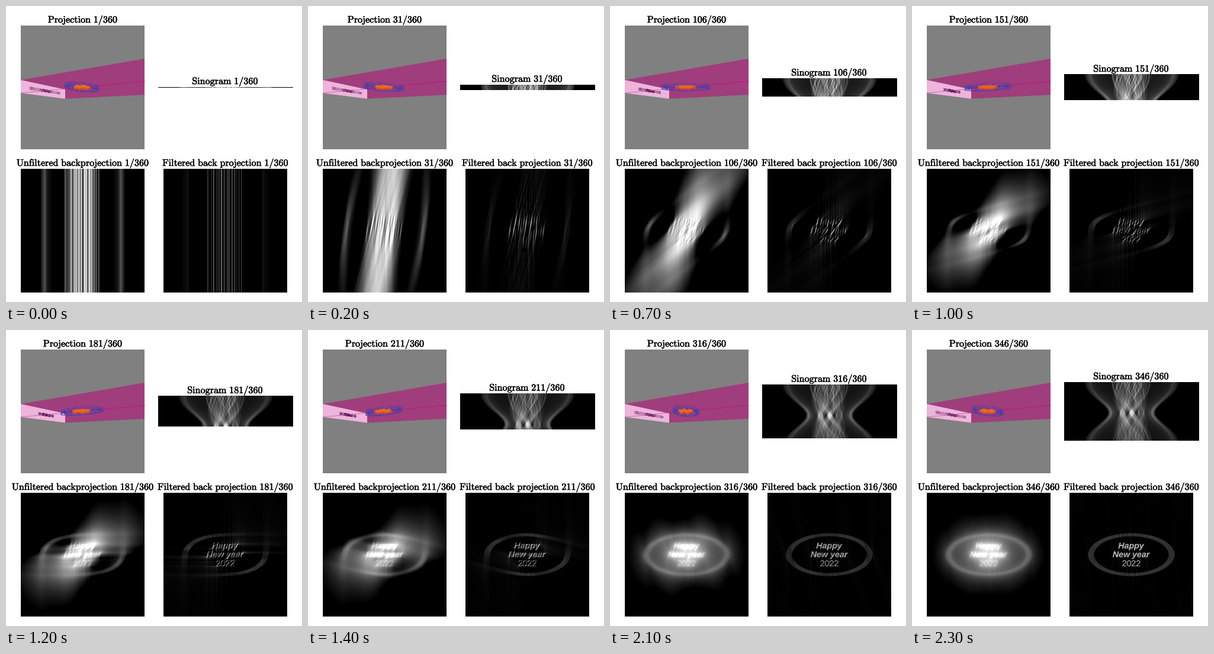
Animation of 500 by 500 pixels, one loop 2.4 s. Source, as a matplotlib script:

```python
import numpy as np
import matplotlib.pyplot as plt
from matplotlib.animation import FuncAnimation
from matplotlib.colors import LinearSegmentedColormap
from matplotlib.patches import PathPatch, Polygon, Rectangle
from matplotlib.path import Path
from matplotlib.patheffects import withStroke
from matplotlib.textpath import TextPath
from matplotlib.transforms import Affine2D

plt.rcParams["mathtext.fontset"] = "cm"

FRAMES, STEP, TOTAL = 24, 15, 360
HALF = 104.5                 # half the side of a panel, in pixels
BIN = 0.5                    # detector bin width
N = int(2 * HALF / BIN)
RING_OUT, RING_IN = (73, 36.3), (63, 31)
RING_VALUE = 0.25


def line_path(s, baseline, **font):
    """One centred line of text, y pointing down."""
    p = TextPath((0, 0), s, size=14.2, prop=dict(family="Liberation Sans", **font))
    box = p.get_extents()
    return Path((p.vertices - [(box.x0 + box.x1) / 2, 0]) * [1, -1] + [0, baseline],
                p.codes)


BOLD = dict(weight="bold", style="italic")
words = Path.make_compound_path(line_path("Happy", -10.5, **BOLD),
                                line_path("New year", 4.3, **BOLD),
                                line_path("2022", 19.5))


def cloud(w, h):
    x, y = np.meshgrid(np.arange(-w + 0.125, w, 0.25), np.arange(-h + 0.125, h, 0.25))
    return np.column_stack([x.ravel(), y.ravel()])


def in_ellipse(p, axes):
    return ((p / axes) ** 2).sum(axis=1) < 1


def make_phantom():
    """Points and weights of the ring and the lettering."""
    ring = cloud(74, 38)
    ring = ring[in_ellipse(ring, RING_OUT) & ~in_ellipse(ring, RING_IN)]
    text = cloud(36, 26)
    mask = np.zeros(len(text), bool)
    for poly in words.to_polygons(Affine2D().scale(20)):
        mask ^= Path(poly / 20).contains_points(text)
    text = text[mask]
    weights = np.r_[np.full(len(ring), RING_VALUE), np.ones(len(text))]
    return np.vstack([ring, text]), weights * 0.25 ** 2 / BIN


def project(points, weights, a):
    u = (points @ [np.cos(a), np.sin(a)] + HALF) / BIN - 0.5
    i = np.floor(u).astype(int)
    f = u - i
    return (np.bincount(i, weights * (1 - f), N)
            + np.bincount(i + 1, weights * f, N))


def ramp(row):
    size = 1024
    return np.fft.irfft(np.fft.rfft(row, size) * np.fft.rfftfreq(size))[:N]


def to_gray(img, low, high):
    """Scale to 0..1 and halve the resolution."""
    img = np.clip((img - low) / (high - low), 0, 1)
    return img.reshape(N // 2, 2, N // 2, 2).mean(axis=(1, 3))


def scan():
    """Sinogram rows, and both reconstructions at every shown step."""
    points, weights = make_phantom()
    det = (np.arange(N) + 0.5) * BIN - HALF
    total = np.zeros((N, N), complex)
    rows, plain, sharp = [], [], []
    for k in range((FRAMES - 1) * STEP + 1):
        a = np.pi * k / TOTAL
        row = project(points, weights, a)
        rows.append(row)
        t = det[None, :] * np.cos(a) + det[:, None] * np.sin(a)
        total += np.interp(t, det, row + 1j * ramp(row), left=0, right=0)
        if k % STEP == 0:
            raw, fil = total.real, total.imag
            plain.append(to_gray(raw, *np.percentile(raw, [50, 99.3])))
            sharp.append(to_gray(fil, 0, 1.15 * fil.max()))
    return np.array(rows), plain, sharp


sino, plain, sharp = scan()

fig = plt.figure(figsize=(5, 5), dpi=100, facecolor="white")
ax = fig.add_axes([0, 0, 1, 1])
ax.set(xlim=(0, 500), ylim=(500, 0))
ax.axis("off")


def panel(data, extent):
    return ax.imshow(data, cmap="gray", vmin=0, vmax=1, aspect="auto", extent=extent)


def title(x, y):
    return ax.text(x, y, "", size=11.6, ha="center", va="baseline",
                   path_effects=[withStroke(linewidth=0.4, foreground="black")])


plain_im = panel(plain[0], (25, 234, 484, 275))
sharp_im = panel(sharp[0], (266, 475, 484, 275))
sino_im = panel(sino[:1], (257, 485, 138, 137))
titles = {"Projection": title(130, 28), "Sinogram": title(370.5, 132),
          "Unfiltered backprojection": title(130, 270),
          "Filtered back projection": title(371, 270)}

# scanner view: background, beam, detector
PINK = "#eeb4dc"
ax.add_patch(Rectangle((25, 33), 209, 209, fc="#808080", lw=0))
ax.add_patch(Polygon([(25, 125), (234, 89), (234, 150), (100, 156.7), (100, 141)],
                     fc="#a03d7d", lw=0))
ax.add_patch(Polygon([(25, 125), (100, 141), (100, 156.7), (25, 147)], fc=PINK, lw=0))

s = np.linspace(0, 1, N // 2 + 1)
f = 1.375 * s / (1 - s + 1.375 * s)      # perspective along the detector
top, bottom = 125 + 16 * f, 147 + 9.7 * f
v = np.array([[0.38], [0.64]])
shadow = ax.pcolormesh(np.vstack([25 + 75 * f] * 2), top + v * (bottom - top),
                       np.zeros((1, N // 2)), vmin=0, vmax=1,
                       cmap=LinearSegmentedColormap.from_list("shade", [PINK, "#5a1c58"]))
ax.plot([25, 100], [147, 139.8], color="#d0409c", lw=0.6, alpha=0.8)
ax.plot([100, 234], [139.8, 127.3], color="#c01880", lw=0.8)

# rotating sample
rng = np.random.default_rng(3)
BLUE = "#3d40b0"
THICK = 3.2
phi = np.linspace(0, 2 * np.pi, 121)
unit = np.column_stack([np.cos(phi), np.sin(phi)])
outer, inner = unit * RING_OUT, unit * RING_IN
ang = rng.uniform(0, 2 * np.pi, 480)
mix = rng.integers(0, 2, (480, 1))
dots = (np.column_stack([np.cos(ang), np.sin(ang)])
        * (mix * RING_OUT + (1 - mix) * np.array(RING_IN)))
dot_z = rng.uniform(-THICK, THICK, 480)


def view(p, a, z=0):
    """Screen position of sample points turned by angle a."""
    c, sn = np.cos(a), np.sin(a)
    t = p[:, 0] * c + p[:, 1] * sn
    r = p[:, 0] * sn - p[:, 1] * c
    return np.column_stack([127.8 + 0.315 * t + 0.456 * r,
                            136.5 + 0.069 * t - 0.052 * r - z])


def annulus(a):
    verts = np.vstack([view(outer, a, THICK), view(inner[::-1], a, THICK)])
    codes = np.full(len(verts), Path.LINETO)
    codes[[0, len(outer)]] = Path.MOVETO
    return Path(verts, codes)


face = ax.add_patch(PathPatch(annulus(0), fc="#5a46a8", alpha=0.3, lw=0))
low_rim, = ax.plot([], [], color=BLUE, lw=0.7)
high_rim, = ax.plot([], [], color=BLUE, lw=0.4, alpha=0.6)
speck, = ax.plot([], [], "o", color=BLUE, ms=0.8, mew=0, alpha=0.65)
letters = [(z, ax.add_patch(PathPatch(words, fc=col, ec=col, lw=0.3, zorder=3)))
           for z, col in ((-3.2, "#b8484a"), (-1.9, "#d0542e"),
                          (-0.6, "#e05e24"), (0.7, "#f0691e"))]


def update(i):
    n = 1 + i * STEP
    a = np.pi * (n - 1) / TOTAL

    for name, label in titles.items():
        label.set_text(r"$\mathrm{%s\ %d/%d}$" % (name.replace(" ", r"\ "), n, TOTAL))

    plain_im.set_data(plain[i])
    sharp_im.set_data(sharp[i])
    rows = sino[:n]
    h = max(0.285 * n, 1)
    y = 137.7 - h / 2
    sino_im.set_data(rows / rows.max())
    sino_im.set_extent((257, 485, y + h, y))
    titles["Sinogram"].set_y(y - 5.3)

    row = sino[n - 1].reshape(-1, 2).mean(axis=1)
    row = np.convolve(row, np.hanning(13) / np.hanning(13).sum(), "same")
    shadow.set_array(np.clip(row / (0.45 * sino.max()), 0, 1)[None, :] ** 0.7)

    face.set_path(annulus(a))
    low_rim.set_data(*view(outer, a, -THICK).T)
    high_rim.set_data(*view(outer, a, THICK).T)
    speck.set_data(*view(dots, a, dot_z).T)
    for z, patch in letters:
        patch.set_path(Path(view(words.vertices, a, z), words.codes))
    return []


anim = FuncAnimation(fig, update, frames=FRAMES, interval=100, repeat=True)
plt.show()
```
